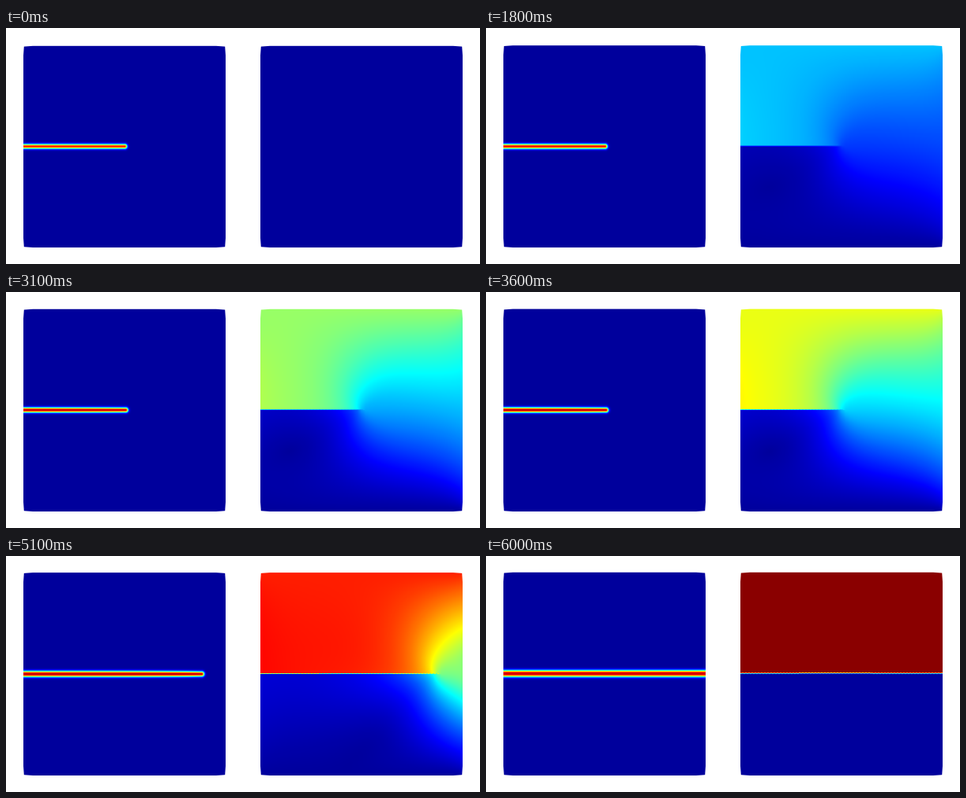
A matplotlib script that plays this animation: 600 by 300 pixels, repeating every 6100 ms.

```python
import numpy as np
import matplotlib.pyplot as plt
from matplotlib.animation import FuncAnimation
from matplotlib.colors import LinearSegmentedColormap
from matplotlib.path import Path

FRAMES, INTERVAL = 61, 100
SIZE, HALF = 256, 128            # plate size in pixels
LEFT, RIGHT, TOP, BOTTOM = 22, 322, 22.8, 279
COLS, ROWS = 48, 24              # mesh of the lower half plate
POISSON = 0.3

JET = LinearSegmentedColormap.from_list("jet_like", [
    (0, (0, 0, 0.5625)), (0.111, (0, 0, 1)), (0.365, (0, 1, 1)),
    (0.492, (0.5, 1, 0.5)), (0.619, (1, 1, 0)), (0.873, (1, 0, 0)),
    (1, (0.5, 0, 0))], N=1024)


def element_stiffness():
    p = POISSON
    elastic = np.array([[1 - p, p, 0], [p, 1 - p, 0], [0, 0, 0.5 - p]])
    xs, ys = np.array([-1, 1, 1, -1]), np.array([-1, -1, 1, 1])
    k = np.zeros((8, 8))
    for a in (-1, 1):
        for b in (-1, 1):
            dx = xs * (1 + ys * b / np.sqrt(3)) / 2
            dy = ys * (1 + xs * a / np.sqrt(3)) / 2
            strain = np.zeros((3, 8))
            strain[0, ::2] = strain[2, 1::2] = dx
            strain[1, 1::2] = strain[2, ::2] = dy
            k += strain.T @ elastic @ strain
    return k


def resample(pixels, cells):
    """Matrix taking node values to pixel centres."""
    at = (np.arange(pixels) + 0.5) / pixels * cells
    nodes = np.arange(cells + 1)
    return np.array([np.interp(at, nodes, row) for row in np.eye(cells + 1)]).T


def unit_fields():
    """Displacement of the lower half for each crack length, unit pull."""
    line = COLS + 1
    i, j = np.meshgrid(np.arange(COLS), np.arange(ROWS))
    first = (j * line + i).ravel()
    corners = first[:, None] + np.array([0, 1, line + 1, line])
    dofs = np.stack([2 * corners, 2 * corners + 1], axis=2).reshape(-1, 8)
    total = 2 * line * (ROWS + 1)
    stiff = np.zeros((total, total))
    np.add.at(stiff, (dofs[:, :, None], dofs[:, None, :]), element_stiffness())
    stiff = stiff[2 * line:, 2 * line:]          # clamped bottom

    size = len(stiff)
    mid = size - 2 * line + 2 * np.arange(line) + 1
    load = np.zeros((size, line))
    load[mid, np.arange(line)] = 1
    give = np.linalg.solve(stiff, load)

    across, up = resample(SIZE, COLS), resample(HALF, ROWS)
    fields = {}
    for k in range(COLS // 2, line):
        tied = np.arange(k, line)
        force = np.linalg.solve(give[np.ix_(mid[tied], tied)],
                                np.full(len(tied), 0.5))
        u = np.concatenate([np.zeros(2 * line), give[:, tied] @ force])
        u = u.reshape(ROWS + 1, line, 2)
        fields[k] = np.array([up @ u[..., c] @ across.T for c in (0, 1)])
    fields[line] = fields[line + 1] = np.zeros((2, HALF, SIZE))
    return fields


FIELDS = unit_fields()
X = np.arange(SIZE) + 0.5
Y = X[:, None] - HALF


def crack_tip(n):
    tip = 128.5 + 1.5 * min(n / 36, 1) ** 2
    return tip + 1.83 * max(n - 37, 0) ** 1.5


def damage(n):
    load, tip = n / 60, crack_tip(n)
    opened = 1 - np.exp(-np.maximum(tip - X, 0) / 45)
    if tip > SIZE + 10:
        opened = np.ones(SIZE)
    width = 2.9 + 0.3 * load + (0.2 * load + 0.8 * load ** 3) * opened
    power = 2 + 0.4 * load * opened
    peak = 0.89 + 0.05 * min(load * 1.6, 1)
    dist = np.hypot(np.maximum(X - tip, 0), Y)
    return peak * np.exp(-(dist / width) ** power)


def displacement(n):
    load, tip = n / 60, crack_tip(n)
    k = np.clip(tip / SIZE * COLS, COLS // 2, COLS + 1)
    lo = int(k)
    ux, uy = FIELDS[lo] + (k - lo) * (FIELDS[lo + 1] - FIELDS[lo])
    field = np.vstack([np.hypot(ux, 1 - uy), np.hypot(ux, uy)[::-1]])

    # stretched cells along the open crack
    lip = (field[HALF - 1] + field[HALF]) / 2
    ends = np.where(np.abs(X / SIZE - 0.47) < 0.18, -0.2, 0.15)
    dots = 0.25 * np.sin(X * np.pi / 2)
    lip = lip * (1 + load ** 4 * (ends + dots))
    field[HALF - 1] = np.where(X < tip, lip, field[HALF - 1])
    return load * field


def outline(left, top):
    """Plate edge, drawn in slightly at the corners."""
    right, cut, far = left + SIZE, 0.8, 12
    pts = [(left + cut, top + cut), (left + far, top), (right - far, top),
           (right - cut, top + cut), (right, top + far),
           (right, BOTTOM - far), (right - cut, BOTTOM - cut),
           (right - far, BOTTOM), (left + far, BOTTOM),
           (left + cut, BOTTOM - cut), (left, BOTTOM - far),
           (left, top + far), (left + cut, top + cut)]
    return Path(pts)


fig = plt.figure(figsize=(6, 3), dpi=100, facecolor="white")
ax = fig.add_axes([0, 0, 1, 1])
ax.axis("off")


def plate(left):
    return ax.imshow(np.zeros((SIZE, SIZE)), cmap=JET, vmin=0, vmax=1,
                     interpolation="bilinear", aspect="auto",
                     extent=(left, left + SIZE, BOTTOM, TOP))


panels = [(plate(LEFT), LEFT, damage), (plate(RIGHT), RIGHT, displacement)]
ax.set_xlim(0, 600)
ax.set_ylim(300, 0)


def update(n):
    top = TOP - 2 * n / 60
    for image, left, field in panels:
        image.set_data(0.013 + 0.976 * field(n))
        image.set_extent((left, left + SIZE, BOTTOM, top))
        image.set_clip_path(outline(left, top), ax.transData)
    ax.set_xlim(0, 600)
    ax.set_ylim(300, 0)
    return [p[0] for p in panels]


anim = FuncAnimation(fig, update, frames=FRAMES, interval=INTERVAL,
                     repeat=True, repeat_delay=0)
plt.show()
```
